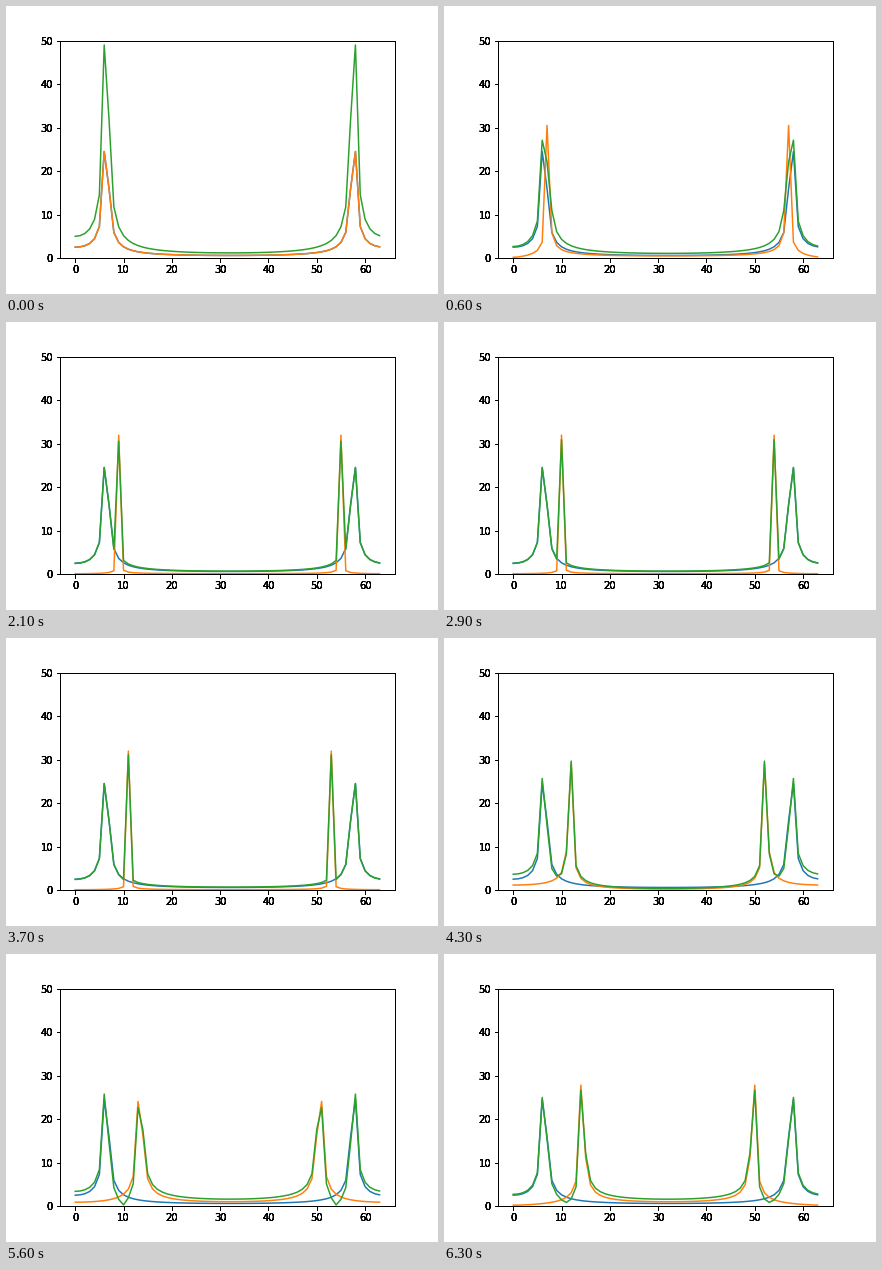
Animation, 432 px wide and 288 px high, one loop 6.4 s. Source, as a matplotlib script:

```python
import numpy as np
import matplotlib.pyplot as plt
from matplotlib.animation import FuncAnimation

SAMPLES = 64
FRAMES = 64
INTERVAL = 100
LABEL_PASSES = 6
BOX = [0.125, 0.125, 0.775, 0.755]

plt.rcParams["font.family"] = "DejaVu Sans"
plt.rcParams["font.size"] = 10

n = np.arange(SAMPLES)


def tone(cycles):
    """Sine wave with the given number of cycles in the window."""
    return np.sin(2 * np.pi * cycles * n / SAMPLES)


def spectrum(signal):
    return np.abs(np.fft.fft(signal))


def add_plot_axes(fig, first):
    ax = fig.add_axes(BOX, label=f"pass {len(fig.axes)}")
    ax.patch.set_visible(first)
    ax.set_xlim(-3.15, 66.15)
    ax.set_ylim(0, 50)
    ax.set_xticks(range(0, 61, 10))
    ax.set_yticks(range(0, 51, 10))
    return ax


fig = plt.figure(figsize=(6, 4), dpi=72, facecolor="white")
ax = add_plot_axes(fig, True)
# Repeated passes darken the antialiased edges of ticks and labels.
for _ in range(LABEL_PASSES - 1):
    add_plot_axes(fig, False)

fixed = tone(6.4)
lines = [ax.plot(n, np.zeros(SAMPLES), color=c, lw=1.5)[0]
         for c in ("tab:blue", "tab:orange", "tab:green")]


def update(i):
    moving = tone(6.4 + i / 8)
    for line, signal in zip(lines, (fixed, moving, fixed + moving)):
        line.set_ydata(spectrum(signal))
    return lines


anim = FuncAnimation(fig, update, frames=FRAMES, interval=INTERVAL,
                     repeat=True, repeat_delay=0, blit=False)
plt.show()
```
